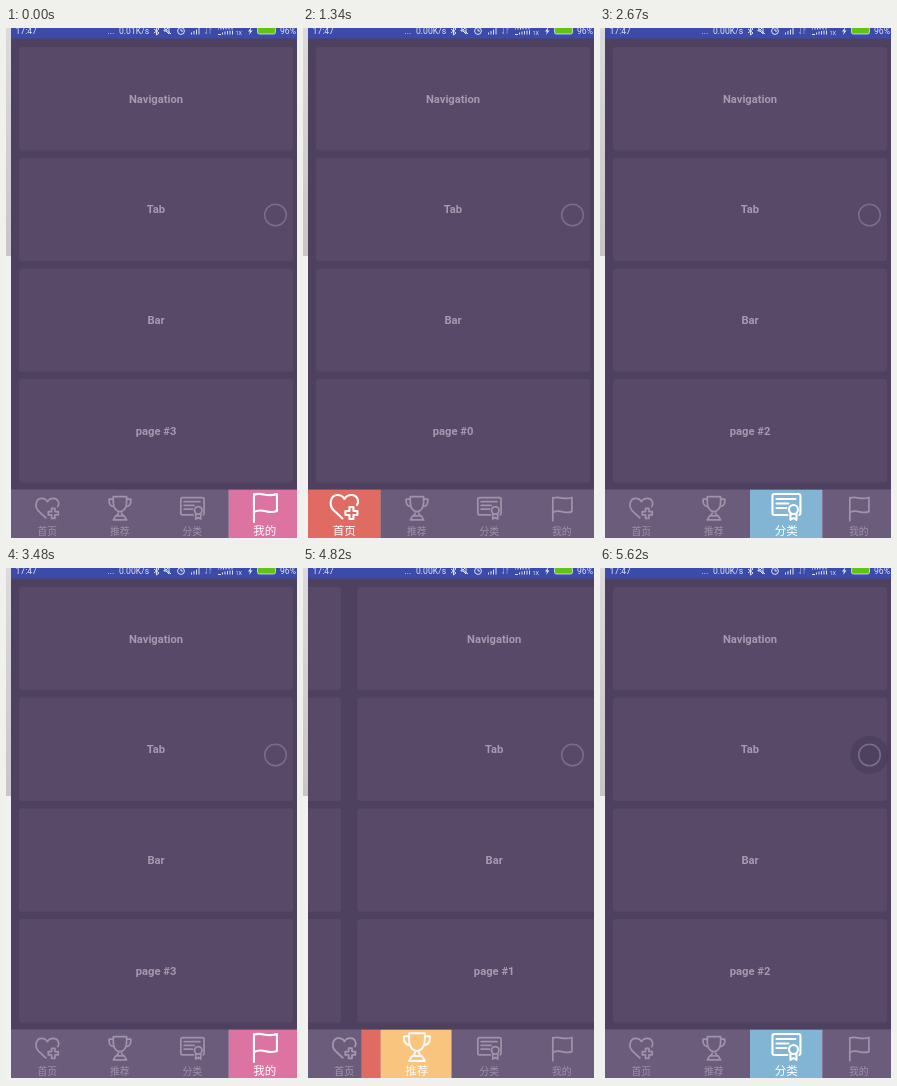
These frames come from a looping animation (291 by 512 pixels, 5980 ms). An HTML page:

```html
<!DOCTYPE html>
<html lang="zh">
<head>
<meta charset="utf-8">
<title>Tab bar</title>
<style>
html, body { margin: 0; width: 100%; height: 100%; overflow: hidden; background: #f1f0f2; }
svg { display: block; width: 100vw; height: 100vh; }
text { font-family: Roboto, "Noto Sans", sans-serif; }
.card text { font-weight: 700; font-size: 11.2px; fill: #a59ab1; text-anchor: middle; }
.status text { font-size: 8.6px; fill: #dfe2f3; }
.label { font-family: "Noto Sans CJK SC", "Noto Sans CJK", sans-serif; text-anchor: middle; }
.icon { fill: none; stroke-width: 2.1; stroke-linejoin: round; stroke-linecap: round; }
.line { fill: none; stroke: #dfe2f3; stroke-width: 1; }
</style>
</head>
<body>
<svg id="stage" viewBox="0 0 291 512" preserveAspectRatio="none">
  <defs>
    <linearGradient id="edge" x1="0" y1="0" x2="0" y2="1">
      <stop offset="0" stop-color="#dddadd"/>
      <stop offset="1" stop-color="#c8c4ca"/>
    </linearGradient>
    <clipPath id="screen"><rect x="5" y="0" width="286" height="510"/></clipPath>
    <clipPath id="pointer"><rect id="window" y="461.5" height="48.5"/></clipPath>
  </defs>
  <rect width="291" height="512" fill="#f1f0f2"/>
  <rect width="5" height="228" fill="url(#edge)"/>
  <g clip-path="url(#screen)">
    <rect x="5" width="286" height="510" fill="#4e405f"/>
    <g id="pages"></g>
    <circle id="ripple" cx="269.5" cy="187" r="19" fill="#48395a" opacity=".55"/>
    <circle cx="269.5" cy="187" r="10.8" fill="none" stroke="#7b6d89" stroke-width="1.5"/>
    <rect x="5" y="461.5" width="286" height="48.5" fill="#6b5c7b"/>
    <g id="colors" clip-path="url(#pointer)"></g>
    <g id="tabs"></g>
    <g class="status">
      <rect x="5" width="286" height="10.5" fill="#3c4ba9"/>
      <text x="9.5" y="6">17:47</text>
      <text x="101.5" y="6">...</text>
      <text id="speed" x="113" y="6"></text>
      <path class="line" d="M148 1l5 4-2.5 2V-1l2.5 2-5 4M158 2l2 0 3-3v7l-3-3h-2zM157 -1l8 7"/>
      <circle class="line" cx="175" cy="3" r="3.4"/>
      <path class="line" d="M175 1v2h2M171 -.5l2-1M179 -.5l-2-1"/>
      <path class="line" d="M185.500 6.500v-2M188 6.500v-3.500M190.500 6.500v-5M193 6.500v-7"/>
      <path class="line" opacity=".4" d="M200.500 0v6l-1.500-2M204 6v-6l1.500 2"/>
      <path class="line" d="M212.500 1.500v-1M215 1.500v-2M217.500 1.500v-2M220 1.500v-2M223 1.500v-2M226 1.500v-2M212 6.500h3M216.500 6.500v-2M219 6.500v-3M221.500 6.500v-3.500M224 6.500v-4M226.500 6.500v-4"/>
      <text x="229.500" y="6.500" style="font-size:5.500px">1X</text>
      <path d="M245.500 -1l-3.500 4.500h2l-1 3.500 3.500-4.500h-2z" fill="#e6e8f6"/>
      <rect x="251.500" y="-1" width="18" height="7" rx="1.800" fill="#61c412" stroke="#dfe2f3" stroke-width=".8"/>
      <text x="274" y="6">96%</text>
    </g>
  </g>
</svg>
<script>
const LOOP = 5980, PAGE = 290, TAB = 72.5, LEFT = 5;

// [start time, pager position]; each position holds until the next start
const STEPS = [
  [0, 3], [1070, 0.5], [1340, 0], [1880, 0.986], [2140, 1], [2410, 1.72],
  [2670, 2], [3210, 2.79], [3480, 3], [4020, 1.127], [4280, 0],
  [4820, 0.858], [5090, 1], [5360, 1.725], [5620, 2]
];

const TABS = [
  { name: '首页', color: '#df6b62', icon:
    'M-2 11.500L-11 3C-16-2-14-12-7-12C-3-12-1-10 0-8C1-10 3-12 7-12C13-12 15-6 12.500-2' +
    'M5 0h4v4h4v4h-4v4h-4v-4h-4v-4h4z' },
  { name: '推荐', color: '#f8c47e', icon:
    'M-8-14H8V-7C8 0 4 4 0 4C-4 4-8 0-8-7Z' +
    'M-8-11H-13V-8C-13-4-10-2-7-2M8-11H13V-8C13-4 10-2 7-2' +
    'M-2 4V6L-4 9M2 4V6L4 9M-5 9H5L8 14H-8Z' },
  { name: '分类', color: '#82b5d3', icon:
    'M1 8H-12Q-14 8-14 6V-11Q-14-13-12-13H12Q14-13 14-11V6Q14 7 13 8' +
    'M-10-8H9M-10-3.500H2M-10 1H0' +
    'M11.500 2.500A4.500 4.500 0 1 1 2.500 2.500A4.500 4.500 0 1 1 11.500 2.500' +
    'M4 6V13L7 11L10 13V6' },
  { name: '我的', color: '#dd73a1', icon:
    'M-11-13V15M-11-12C-4-16 1-9 12-13V4C2 8-1 0-11 5' }
];

const $ = id => document.getElementById(id);

function add(parent, tag, attrs, text) {
  const el = document.createElementNS('http://www.w3.org/2000/svg', tag);
  for (const key in attrs) el.setAttribute(key, attrs[key]);
  if (text) el.textContent = text;
  parent.appendChild(el);
  return el;
}

function buildPage(index) {
  const page = add($('pages'), 'g', { class: 'card' });
  ['Navigation', 'Tab', 'Bar', 'page #' + index].forEach((title, row) => {
    const y = 19 + row * 110.7;
    add(page, 'rect', { x: 13, y, width: 274, height: 103.3, rx: 3, fill: '#574967' });
    add(page, 'text', { x: 150, y: y + 55.600 }, title);
  });
  return page;
}

function buildTab(tab, index) {
  const x = LEFT + index * TAB;
  add($('colors'), 'rect', { x, y: 461.5, width: TAB + .1, height: 48.5, fill: tab.color });
  return {
    x: x + TAB / 2,
    icon: add($('tabs'), 'path', { class: 'icon', d: tab.icon }),
    label: add($('tabs'), 'text', { class: 'label', y: 506.5 }, tab.name)
  };
}

const pages = TABS.map((_, i) => buildPage(i));
const tabs = TABS.map(buildTab);
const mix = (a, b, k) => a + (b - a) * k;
const tint = k => `rgb(${[158, 147, 170].map(c => Math.round(mix(c, 255, k)))})`;

function positionAt(time) {
  let pos = STEPS[0][1];
  for (const [start, value] of STEPS) if (time >= start) pos = value;
  return pos;
}

function render(time) {
  const pos = positionAt(time);
  pages.forEach((page, i) => page.setAttribute('transform', `translate(${(i - pos) * PAGE} 0)`));

  // The leading edge runs ahead of the trailing edge
  const base = Math.floor(pos), part = pos - base;
  const start = LEFT + TAB * (base + part * part);
  const end = LEFT + TAB * (base + 2 - (1 - part) ** 2);
  $('window').setAttribute('x', start);
  $('window').setAttribute('width', end - start);

  tabs.forEach(({ x, icon, label }, i) => {
    const near = Math.max(0, 1 - Math.abs(pos - i));
    const k = near * near * (3 - 2 * near);
    icon.setAttribute('transform', `translate(${x + .2} ${mix(480.3, 479, k)}) scale(${mix(.83, 1, k)})`);
    icon.setAttribute('stroke', tint(k));
    label.setAttribute('x', x);
    label.setAttribute('font-size', mix(9.8, 11.5, k));
    label.setAttribute('fill', tint(k));
  });

  const pressed = time >= 4020 && time < 4280 || time >= 5620;
  $('ripple').setAttribute('visibility', pressed ? 'visible' : 'hidden');
  $('speed').textContent = time < 800 ? '0.01K/s' : '0.00K/s';
}

const origin = performance.now();
function tick() {
  render((performance.now() - origin) % LOOP);
  requestAnimationFrame(tick);
}
tick();
</script>
</body>
</html>
```
